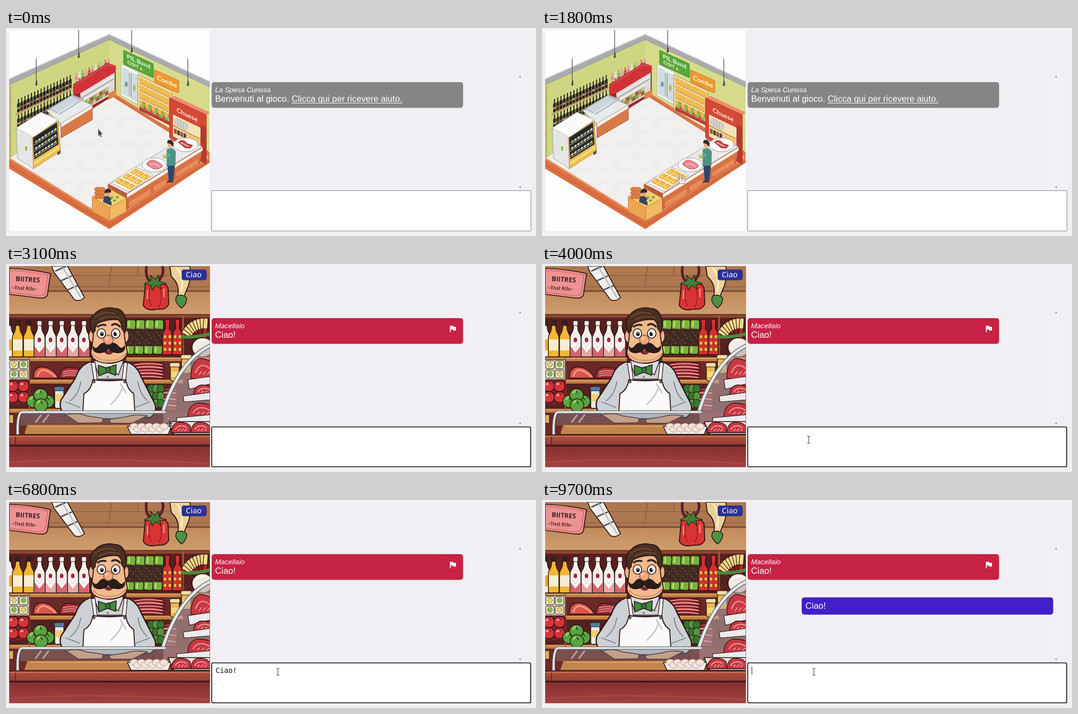
These frames come from a looping animation (1000x392 px, 9800 ms). An HTML page with a canvas:

```html
<!DOCTYPE html>
<html lang="it">
<head>
<meta charset="utf-8">
<title>Chat in bottega</title>
<style>
html, body { margin: 0; width: 100%; height: 100%; overflow: hidden; background: #f1eff3; }
canvas { display: block; width: 1000px; height: 392px; }
</style>
</head>
<body>
<canvas id="stage"></canvas>
<script>
const LOOP = 9800, STEP = 100, W = 1000, H = 392;
const S = window.devicePixelRatio || 1;
const SANS = '"Liberation Sans", Arial, sans-serif';
const MONO = '"DejaVu Sans Mono", monospace';
const HAND = 'Lato, sans-serif';
const INK = '#2a1514';
let g;

// Drawing helpers
function paint(p, fill, ink, w = 1) {
  if (fill) { g.fillStyle = fill; g.fill(p); }
  if (ink) { g.strokeStyle = ink; g.lineWidth = w; g.stroke(p); }
}
function shape(d, fill, ink, w) { paint(new Path2D(d), fill, ink, w); }
function box(x, y, w, h, r, fill, ink, lw) {
  const p = new Path2D();
  p.roundRect(x, y, w, h, r);
  paint(p, fill, ink, lw);
}
function oval(x, y, rx, ry, fill, ink, w, turn = 0) {
  const p = new Path2D();
  p.ellipse(x, y, rx, ry, turn, 0, Math.PI * 2);
  paint(p, fill, ink, w);
}
function label(s, x, y, font, fill = '#fff') {
  g.font = font;
  g.fillStyle = fill;
  g.fillText(s, x, y);
}
function rep(n, fn) { for (let i = 0; i < n; i++) fn(i); }
function fade(y0, y1, top, bottom) {
  const f = g.createLinearGradient(0, y0, 0, y1);
  f.addColorStop(0, top);
  f.addColorStop(1, bottom);
  return f;
}
function plane(x, y, slope, fn) {
  g.save();
  g.transform(1, slope, 0, 1, x, y);
  fn();
  g.restore();
}
function turned(x, y, a, fn) {
  g.save();
  g.translate(x, y);
  g.rotate(a);
  fn();
  g.restore();
}
function setup(c) {
  c.width = W * S;
  c.height = H * S;
  const ctx = c.getContext('2d');
  ctx.scale(S, S);
  ctx.lineJoin = ctx.lineCap = 'round';
  return ctx;
}
function layer(draw) {
  const c = document.createElement('canvas');
  g = setup(c);
  g.beginPath();
  g.rect(6, 4, 378.5, 379);
  g.clip();
  draw();
  return c;
}

// Isometric shop
function room() {
  box(6, 4, 379, 379, 0, '#fdfdfd');
  shape('M195 122 384 242 195 366 6 246Z', '#efeeed');
  rep(10, i => rep(10, j => {
    if ((i + j) % 2) return;
    const x = 195 + (i - j) * 18.9, y = 122 + (i + j) * 12.1;
    shape(`M${x} ${y}l18.9 12.1-18.9 12.1-18.9-12.1Z`, '#f2f1ef', '#ebe9e7', .5);
  }));
  shape('M6 104 195 20V124L6 246Z', '#ced681');
  shape('M195 20 384 108V245L195 124Z', '#d6db8c');
  shape('M6 110V246L10 243V108Z', '#b9b762');
  shape('M195 118 384 234V245L195 126Z', '#d9754a');
  shape('M6 96 195 12 384 101V111L195 22 6 107Z', '#a9abae', '#8b8e92', .7);
  shape('M6 96 195 12 384 101', null, '#cfd1d3', 1.6);
  shape('M6 244 195 361 384 242V254L195 379 6 265Z', '#dc7042');
  shape('M6 257 195 373 384 250', null, '#c9633b', 2);
  shape('M6 246 195 363 384 244', null, '#f0a175', 2);
  [[57, 58, 108], [137, 4, 56], [237, 4, 46], [343, 58, 109]].forEach(([x, a, b]) => {
    shape(`M${x} ${a}V${b}`, null, '#55575b', 1.3);
    shape(`M${x - 2} ${b}h4v-9h-2Z`, '#4c4e52');
  });
}
function bottles(x, y, n, tall, colors) {
  plane(x, y, -.46, () => rep(n, i => {
    const k = i * 6.1, c = colors[i % colors.length];
    box(k, -tall * .68, 5.2, tall * .68, 1, c);
    box(k + 1.6, -tall, 2, tall * .4, 0, c);
    box(k + .4, -tall * .38, 4.2, 3, 0, i % 3 ? '#a45a38' : '#d9bf7d');
  }));
}
function leftShelves() {
  [160, 189].forEach(y => {
    bottles(21, y, 17, 25, ['#272425', '#302823', '#211f23']);
    shape(`M18 ${y + 1}L124 ${y - 48}v4L18 ${y + 5}Z`, '#c4a06a');
  });
  bottles(130, 106, 11, 20, ['#d98ca1', '#e8e2d6', '#84ad72', '#e3a2ad', '#c55445']);
  shape('M127 106 191 66 207 71V125L144 164 127 152Z', '#962b2e');
  shape('M127 108 190 68 207 71 206 86 140 123 128 126Z', '#d2313a', '#ae2027', .7);
  shape('M128 109 190 69 206 72', null, '#e4585c', 2);
  shape('M140 123 205 84V122L143 157Z', '#dcdad6');
  plane(141, 127, -.59, () => {
    rep(3, r => box(0, r * 5, 62, 1.6, 0, r % 2 ? '#8d8f93' : '#fafafa'));
    box(0, 15, 52, 14, 0, '#6e8f62');
    rep(2, r => rep(9, i => oval(3 + i * 5.8, 18 + r * 8, 3, 3, ['#c8473b', '#8fb257', '#e3c16c'][(i + r) % 3])));
  });
  shape('M193 124l15-9v12l-15 9Z', '#dd8449');
  // Counter with glass
  shape('M77 156 123 129 163 145 104 180Z', '#e5e9e9', '#9ba4a7');
  shape('M104 180 163 145V173L104 207Z', '#d97b48', '#a75a37');
  shape('M104 180 163 145V151L104 187Z', '#f2f1ed');
  shape('M81 152 125 126 147 134 102 162Z', '#c6d3d7cc', '#8b979c');
  shape('M98 160l31-18M119 158l-15 16M138 147l-15 16', null, '#fff');
  // Fridge
  shape('M20 188 66 159 98 173 52 206V265L22 246Z', '#e4e5e5', '#a6a9a9');
  shape('M20 188 66 159 98 173 52 206Z', '#fafafa', '#c3c5c5');
  shape('M50 207 98 175 103 232 52 265Z', '#f0c04f', '#a9792d', .8);
  shape('M51 207 96 178 99 219 53 248Z', '#25282c');
  plane(54, 217, -.64, () => rep(3, r => {
    box(-1, r * 12 + 2, 44, 1.5, 0, '#a4a7a2');
    rep(7, i => oval(3 + i * 6, r * 12 - 1, 2.5, 2, (i + r) % 4 ? '#dddcad' : '#b9c95b'));
  }));
  shape('M54 255 100 225', null, '#f9dd92', 3);
  shape('M35 216l6 4v16l-6-4Z', '#e6efd8');
  oval(38, 227, 2, 5, '#91b957');
  shape('M97 234l6-4v6l-6 4Z', '#5b5547');
}
function rightShelves() {
  shape('M218 68 251 84V145L218 127Z', '#fafafa', '#a9b4b6');
  shape('M221 75l11 6v49l-11-6ZM236 83l11 6v50l-11-6Z', '#cfdddf', '#bccacd');
  shape('M233 85v43M236 87v43', null, '#68777b');
  oval(227, 106, 3, 5, '#72a0b5');
  oval(242, 113, 3, 7, '#c4b77d');
  plane(222, 42, .46, () => {
    box(0, 0, 56, 26, 2, '#58a839', '#387a28');
    label('PIL Bond', 6, 12, `bold 11px ${HAND}`, '#eef7e2');
    label('COIT a.', 7, 22, `bold 9px ${HAND}`, '#eef7e2');
  });
  plane(280, 79, .43, () => {
    box(0, 0, 46, 24, 2, '#ee9930', '#d67720');
    label('Combe', 5, 16, `bold 12px ${HAND}`, '#fff3d8');
  });
  shape('M249 88 313 119V192L249 154Z', '#f3e6be', '#a98851');
  plane(251, 93, .49, () => {
    rep(4, r => {
      box(0, r * 14 + 9, 61, 2, 0, '#c79c54');
      rep(10, i => oval(4 + i * 6, r * 14 + 4, 4, 5,
        r > 2 && i % 2 ? '#8fae4f' : '#f4c04c', '#d99837', .5, -.5));
    });
    box(0, 55, 61, 7, 0, '#b84038');
    rep(9, i => oval(5 + i * 6, 53, 3, 3, i % 2 ? '#d15b43' : '#8ab156'));
  });
  // Cheese stand
  shape('M309 132 318 128 384 159 378 164Z', '#ef8a6a');
  shape('M309 132 378 164V257L309 207Z', '#d34935', '#a93429');
  shape('M315 163 367 188V233L315 204Z', '#f4e2b7');
  plane(315, 163, .48, () => {
    label('Chuese', 7, -8, `bold 12px ${HAND}`, '#ffeadf');
    box(0, 20, 52, 2, 0, '#c28442');
    rep(4, i => {
      oval(8 + i * 5, 11, 4, 7, '#d5d3cd', '#929391', .6);
      box(2 + i * 6, 25, 5, 9, 0, i % 2 ? '#5d4035' : '#8f5d38');
      oval(31 + i * 6, 27, 4, 6, '#f3c878', '#d69b4b', .6);
    });
  });
  shape('M367 183l11 4v70l-11-6Z', '#b53a2e');
}
function counters() {
  shape('M193 294 334 207 371 224 228 312Z', '#e9eaec', '#a3a6a9');
  shape('M228 312 371 224 366 255 228 341Z', '#d97343', '#a94f31');
  shape('M193 294 228 312V341L193 322Z', '#bf5e39', '#a94f31');
  shape('M228 313 371 225V231L228 320Z', '#f5f4f2');
  shape('M232 327l42-26v13l-42 24ZM278 298l25-15v13l-25 14ZM321 271l42-25v11l-42 25Z', '#e78c58', '#ba5d38', .8);
  shape('M199 292 243 262 277 277 232 308Z', '#fbfaf7', '#aaa7a0');
  rep(3, i => rep(3, j => {
    const x = 213 + i * 14 + j * 10, y = 290 - i * 9 + j * 5;
    shape(`M${x - 7} ${y}l10-7 8 4-10 7Z`, '#f4ba3f', '#dc9328', .7);
    oval(x, y - 1, 2.5, 1.5, '#fbe082');
  }));
  [[280, 258, 23, 13], [339, 220, 23, 13]].forEach(p => oval(...p, '#fff', '#9c9c9c'));
  shape('M265 257q3-9 13-8 13 4 18 11-8 9-19 5Z', '#ea8792', '#b94f60');
  shape('M273 257q10-3 16 5', null, '#f6c3c7', 2);
  shape('M325 215q9-8 17 3l10 3q-3 9-15 4Z', '#c84748', '#933231');
  shape('M330 216l14 7', null, '#f0b8a9', 2);
  // Clerk
  shape('M304 254h15l-3 34-9 1Z', '#344468');
  shape('M306 288h9v3h-12Z', '#453132');
  shape('M304 229q10-6 16 4l-1 26-15 1Z', '#4d9488', '#377369', .7);
  shape('M306 235l-10 8 3 3 13-5', '#5eab9c');
  oval(299, 241, 4, 3, '#e7c861');
  oval(310, 219, 5, 7, '#e9ac82');
  shape('M304 217q0-8 8-6 6 4 3 13-4-7-11-7Z', '#342b2b');
  // Till
  shape('M163 318 193 302 227 321 196 339Z', '#f5ce70', '#cd9540');
  shape('M163 318 196 339V363L163 346Z', '#eda552', '#cc7b37');
  shape('M196 339 227 321V346L196 363Z', '#f1ba62', '#cc7b37');
  rep(9, i => oval(172 + i % 3 * 5, 304 + (i / 3 | 0) * 7, 5, 4, '#dd8045', '#b65f34', .6));
  oval(192, 311, 5, 6, '#e5a57b');
  shape('M186 311q-1-8 7-8 7 1 5 7Z', '#302b2c');
  shape('M185 318q8-4 14 4v13l-16-7Z', '#37445f');
  rep(6, i => oval(200 + i % 3 * 5, 319 + (i / 3 | 0) * 6, 3, 2, i % 2 ? '#e8d475' : '#70a34d'));
}
function store() { room(); leftShelves(); rightShelves(); counters(); }

// Butcher shop
function backdrop() {
  box(6, 4, 379, 379, 0, '#6d2925');
  box(6, 4, 379, 49, 0, '#ad7851');
  shape('M84 22H384M84 43H384M199 4l-5 39M249 4v18', null, '#845438', 1.2);
  box(6, 50, 379, 46, 0, fade(50, 95, '#c08a5c', '#cf9d6d'));
  shape('M6 51H384', null, '#7b4a32', 3);
  shape('M6 95H384V102H6Z', '#8f4332', INK);
  box(6, 102, 379, 73, 0, '#56211f');
  box(44, 184, 340, 33, 0, '#6b2928');
  box(6, 226, 379, 54, 0, '#55211f');
  [[6, 175, 155], [226, 175, 158], [44, 217, 110], [235, 217, 100], [6, 272, 110]].forEach(([x, y, w]) => {
    box(x, y, w, 9, 1, '#c37b43', INK, 1.2);
    box(x + 2, y + 2, w - 4, 2, 0, '#df9b5b');
  });
  shape('M44 178V278M334 98V176', null, '#a96037', 3);
}
function hangings() {
  shape('M6 8Q50 10 84 18L78 59Q74 66 61 64L6 57Z', '#ee9291', INK, 1.7);
  shape('M6 12Q49 14 79 21L74 55Q70 61 60 60L6 53', null, '#c9545c', 1.2);
  turned(18, 32, .06, () => {
    label('BIITRES', 0, 0, 'bold 12.5px "Open Sans", sans-serif', '#392025');
    label('–Tnsl Rils–', -6, 16, 'bold 9.5px "Open Sans", sans-serif', '#592c30');
  });
  shape('M86 4H116L148 63Q139 72 129 67L91 16Z', '#f2f0ed', INK, 1.7);
  rep(3, i => shape(`M${94 + i * 11} ${13 + i * 18}l18-8`, null, '#53545b', 3));
  shape('M108 8l33 55', null, '#bfc0c3', 3);
  shape('M265 4Q262 27 274 34M295 4Q300 18 288 31', null, '#5b1f25', 5);
  shape('M263 38Q276 32 288 39 304 34 306 47L307 76Q302 87 286 85 266 90 259 78Z', '#d93433', INK, 1.8);
  shape('M272 45Q266 64 274 78M291 47Q296 65 289 80', null, '#a72129', 2);
  shape('M267 50v15M298 47v14', null, '#f3826e', 3);
  shape('M260 38l14-8-2-9 9 8 7-8 1 11 14 5-13 2 3 8-11-6-6 8-3-9Z', '#437d35', INK, 1.2);
  shape('M309 4H347Q350 32 341 48L334 66 324 62Q329 38 312 24Z', '#ecd19a', INK, 1.8);
  shape('M323 8q13 16 8 42', null, '#fff0c7', 3);
  shape('M322 60Q334 56 341 64 340 78 331 83 323 77 320 68Z', '#4d9144', INK, 1.5);
}
function bottle(x, w, body, cap) {
  const a = w * .1, b = w * .22;
  shape(`M${x + a + b} 114h${w * .36}q0 12 ${b} 18q${a} 3 ${a} 8v35h${-w}v-35q0-5 ${a}-8q${b}-6 ${b}-18Z`, body, INK, 1.4);
  box(x + w * .28, 107, w * .44, 9, 2, cap, INK);
}
function topShelf() {
  [[-4, '#f4f0e7', '#e4a73b'], [12, '#f1b732', '#f7edce'], [33, '#f0b735', '#f7edce']].forEach(([x, c, tag]) => {
    bottle(x, 20, c, '#302525');
    box(x + 1, 142, 18, 21, 0, tag);
  });
  rep(5, i => {
    const x = 53 + i * 21, w = 20.5;
    bottle(x, w, '#f8f5ef', '#faf6ef');
    shape(`M${x + 1} 155l9 12 9.5-12v19H${x + 1}Z`, i % 2 ? '#e9a3a5' : '#d9626c');
    shape(`M${x + 10} 130l8 13-8 15-8-15Z`, '#fff', '#d6a4a5', .6);
    oval(x + 10, 143, 3.5, 4.5, '#a32a38');
  });
  rep(4, i => turned(235 + i * 17.5, 138, .05, () => {
    box(-9, -33, 17.5, 65, 4, '#78b23c', INK, 1.5);
    box(-8, -16, 15.5, 33, 0, '#422823');
    shape('M-4-29v9M-4 20v8', null, '#c0dd70', 3);
    rep(5, k => oval(-4 + k % 3 * 4, -9 + k * 5, 1.5, 1, '#8b5941'));
  }));
  [295, 314].forEach(x => {
    shape(`M${x + 5} 104h9l-1 18q6 6 6 16v33h-19v-33q0-10 6-16Z`, '#d62e31', INK, 1.5);
    rep(6, k => oval(x + 5 + k % 2 * 9, 137 + (k / 2 | 0) * 12, 3.2, 3.8, '#efbd42', '#8a2426'));
  });
  rep(8, i => turned(374, 149, -1.05 + i * .16, () => {
    box(-4, -47, 8, 46, 2, i % 2 ? '#b62229' : '#5a1d20', INK);
    box(-4, -47, 8, 20, 2, '#f2d885', INK);
  }));
  shape('M333 137q24 2 51-5', null, '#4d873a', 6);
  oval(371, 157, 20, 18, '#f3eae2', INK, 1.5);
  shape('M358 151q8-10 17-7', null, '#fff', 3);
}
function lowShelves() {
  box(4, 180, 40, 38, 2, '#cfcbb2', INK);
  rep(4, i => {
    const x = 15 + i % 2 * 18, y = 189 + (i / 2 | 0) * 18;
    box(x - 8, y - 7, 16, 15, 3, '#faf6e2', INK);
    oval(x, y, 5, 5, i % 3 ? '#8eb648' : '#e9cd64', '#758147');
  });
  box(4, 219, 41, 45, 2, '#762527');
  rep(4, i => {
    const x = 13 + i % 2 * 20, y = 230 + (i / 2 | 0) * 21;
    oval(x, y, 10.5, 10.5, '#d8333b', INK, 1.3);
    oval(x - 3, y - 4, 3, 2, '#f39a91');
    shape(`M${x} ${y - 8}l3 4`, null, '#7d1d25', 2);
  });
  shape('M52 215Q51 194 70 194 89 196 99 215Z', '#dc5550', INK, 1.4);
  shape('M59 211q4-13 14-11 10 3 20 12', null, '#f4a17c', 3);
  shape('M101 215q2-21 19-20l32 3-7 17Z', '#a62f37', INK, 1.3);
  rep(3, i => shape(`M108 ${203 + i * 4}q18-5 35 2`, null, '#edaaa0', 1.5));
  rep(5, i => shape(`M238 ${188 + i * 6}q31-8 59 0l3 5q-32-5-62 0Z`, i % 2 ? '#ce4549' : '#a92734', INK));
  rep(5, i => shape(`M243 ${190 + i * 6}q25-4 51 0`, null, '#f1b8b3', 1.7));
  [[310, 191, 17], [331, 176, 18]].forEach(([x, y, w]) => {
    box(x, y, w, 30, 5, '#e8b951', INK, 1.4);
    box(x - 1, y - 5, w + 2, 8, 2, '#f3dfa8', INK);
    box(x + 2, y + 12, w - 5, 10, 1, '#f5d784');
  });
  [[52, 259], [78, 259], [65, 247], [66, 266]].forEach(([x, y]) => {
    oval(x, y, 13, 12, '#57a43f', INK, 1.4);
    shape(`M${x - 6} ${y - 4}q3-5 7-4`, null, '#a2cf69', 3);
    shape(`M${x} ${y - 8}l2 5`, null, '#263e25', 2);
  });
  box(92, 236, 17, 36, 4, '#e5edf0', INK, 1.3);
  box(91, 231, 19, 8, 2, '#557da2', INK);
  box(94, 245, 13, 14, 1, '#f3cd78');
  rep(7, i => shape(`M294 ${236 + i * 6}q13-5 28 0v4q-15-3-28 0Z`, i % 2 ? '#e5807e' : '#b4303b', INK, .8));
  rep(9, i => oval(274 + i % 3 * 9, 235 + (i / 3 | 0) * 14, 7, 8, i % 2 ? '#4f963d' : '#37762f', INK));
}
function butcher() {
  shape('M160 184Q139 190 131 215L104 256Q98 272 112 284L150 292H235L273 289Q288 277 279 260L255 213Q247 190 226 184 194 198 160 184Z', '#cdd1d4', INK, 2.3);
  shape('M141 222q-3 23-20 36M249 222q3 22 17 35M113 260l26 10M271 260l-26 10', null, '#798087', 1.8);
  shape('M165 182l10 27 18-15 19 15 10-27Z', '#dde0e1', INK, 1.4);
  shape('M161 186 166 219H226L229 186 223 185 219 217H172L168 185Z', '#f4f3f2', INK, 1.3);
  shape('M164 218Q160 239 147 244L145 278H243L241 244Q229 237 226 218Q194 222 164 218Z', '#fbfaf9', INK, 1.8);
  shape('M220 231q-4 17-22 33M216 226l10 17', null, '#c8cbd0', 3);
  oval(166, 222, 2.3, 2.3, '#7d8388', INK);
  oval(224, 222, 2.3, 2.3, '#7d8388', INK);
  oval(162, 136, 6, 12, '#eeb082', INK, 1.7);
  oval(226, 136, 6, 12, '#eeb082', INK, 1.7);
  shape('M166 108Q166 138 160 167 162 186 194 187 226 186 229 166 222 140 222 108 196 92 166 108Z', '#f2b98c', INK, 1.8);
  shape('M164 169q9 13 30 13 22 0 32-14', null, '#d18c67', 2);
  shape('M163 130C158 114 155 101 166 96 174 84 192 80 206 84 220 84 226 98 225 108 228 116 227 124 224 130L218 121Q219 110 211 105 192 103 173 112 168 118 168 126Z', '#493022', INK, 1.8);
  shape('M168 100q20-14 38-6M176 105q18-9 38-4', null, '#7a4f36', 1.8);
  [[180, 131], [207, 131]].forEach(([x, y], i) => {
    oval(x, y, 8, 9, '#fff', INK, 1.5);
    oval(x + (i ? -1 : 1), y + 1, 3.3, 4, '#24191a');
    oval(x + 1, y - 1, 1, 1, '#fff');
    shape(`M${x - 7} ${y - (i ? 16 : 13)}q7-5 15 ${i ? 3 : -3}`, null, '#35231e', 3.5);
  });
  oval(194, 163, 9, 7, '#862b30', INK);
  box(188, 159, 13, 4, 1, '#fff');
  shape('M193 150Q182 146 175 155 169 163 164 155 163 169 180 167 189 166 193 160 198 166 208 167 225 169 224 154 218 163 212 155 204 146 193 150Z', '#2a1e1d', INK, 1.3);
  oval(193, 143, 9, 9, '#eba77e', '#8a503d', 1.4);
  oval(190, 140, 3, 2, '#f9ceab');
  shape('M174 191l16 5 18-6-1 20-15-6-17 7Z', '#448a3d', INK, 1.6);
  box(188, 195, 9, 10, 2, '#346d31', INK);
  oval(192, 213, 1.7, 1.7, '#686d70');
  shape('M113 284Q137 279 151 286L184 291 181 299 137 300Z', '#e8ad83', INK, 1.5);
  shape('M267 286Q242 282 227 288L194 293 198 300 238 300Z', '#e8ad83', INK, 1.5);
}
function steak(x, y, w, h) {
  shape(`M${x} ${y + h}q0-${h * .8} ${w * .35}-${h}q${w * .5} 0 ${w * .65} ${h * .4}v${h * .6}Z`, '#c73843', INK, 1.3);
  shape(`M${x + w * .2} ${y + h * .7}q${w * .2}-${h * .6} ${w * .6}-${h * .2}`, null, '#f19a99', 2);
  rep(3, i => shape(`M${x + w * (.35 + i * .18)} ${y + h * .8}l${w * .1}-${h * .15}`, null, '#f7c6bd', 1.2));
}
function display() {
  shape('M384 154Q321 192 297 278V300H384Z', '#b9a3a399');
  steak(349, 178, 44, 38);
  shape('M343 218L385 212V226L346 236Z', '#eceaea', INK, 1.2);
  steak(354, 228, 40, 18);
  shape('M334 249L385 242V256L336 260Z', '#eceaea', INK, 1.2);
  steak(343, 262, 50, 26);
  shape('M322 290L385 284V298H322Z', '#eceaea', INK, 1.2);
  shape('M385 154C344 174 316 216 296 278', null, '#686d72', 8);
  shape('M385 154C344 174 316 216 296 278', null, '#e5eaeb', 5);
  box(27, 280, 270, 24, 0, '#8b8a9466');
  shape('M40 302H310V321H34Z', '#c2854e', '#6d392a', 1.4);
  shape('M46 306H232', null, '#d9a467', 2);
  shape('M66 285l-10 13M80 285l-10 13', null, '#f0f4f580', 3);
  shape('M22 321Q21 281 30 279H300', null, '#686d72', 6);
  shape('M22 321Q21 281 30 279H300', null, '#e5eaeb', 3.6);
  box(6, 284, 8, 16, 1, '#dfb25e', INK);
  shape('M229 306H312L306 321H236Z', '#f0eeeb', INK, 1.6);
  rep(9, i => oval(242 + i * 7, 306 + i % 2 * 5, 8, 6, '#f5e3dc', '#a58582', .8));
  shape('M306 297H385V321H317Z', '#e8dedd', INK, 1.5);
  rep(2, i => steak(312 + i * 37, 298, 36, 20));
  box(6, 322, 379, 20, 0, fade(322, 342, '#b0523f', '#953d35'), INK, 1.5);
  shape('M6 325H384', null, '#c96f50', 2);
  shape('M6 342H384', null, '#3b1719', 3);
  box(6, 344, 379, 40, 0, fade(344, 383, '#86302f', '#a24340'));
  shape('M6 374Q160 363 384 376', null, '#a94b45', 2);
  shape('M18 326v14', null, '#682c2b', 2);
}
function shop() {
  backdrop(); hangings(); topShelf(); lowShelves(); butcher(); display();
  box(332, 11, 46, 19, 3, '#2b319b', '#232781');
  label('Ciao', 339.3, 24.5, '14.5px "Noto Sans", "Open Sans", sans-serif');
}

// Chat panel
const OPEN = 2150, SENT = 7100;
const KEYS = [[4700, 'C'], [4900, 'i'], [5100, 'a'], [5300, 'o'], [6200, '!']];
const clamp = v => Math.min(1, Math.max(0, v));
const swing = v => .5 - Math.cos(Math.PI * clamp(v)) / 2;

function bubble(x, y, h, color) {
  if (h > 0) box(x, y, 474.5, h, Math.min(5, h / 2), color);
}
function chat(t) {
  g.textBaseline = 'alphabetic';
  const name = `italic 13.2px ${SANS}`, text = `16.56px ${SANS}`;
  if (t < OPEN) {
    bubble(388, 102, 48.5, '#868586');
    label('La Spesa Curiosa', 394.5, 120.5, name);
    label('Benvenuti al gioco. ', 394.5, 139, text);
    const x = 394.5 + g.measureText('Benvenuti al gioco. ').width, help = 'Clicca qui per ricevere aiuto.';
    label(help, x, 139, text);
    box(x, 141, g.measureText(help).width, 1, 0, '#fff');
    return;
  }
  bubble(388, 102, 48.5 * swing((t - OPEN) / 400), '#c82245');
  box(829.5, 109.5, 26, 25, 3, '#c8224566', '#bd2444');
  label('Macellaio', 394.5, 120.5, name);
  label('Ciao!', 394.5, 139, text);
  shape('M837.5 116.5h6l.5 2h5v7h-5l-.6-2h-4.3v5h-1.6Z', '#fff');
  if (t < SENT) return;
  bubble(490, 183.5, 32.5 * swing((t - SENT) / 400), '#421fca');
  label('Ciao!', 497, 205, text);
}
function panel(t) {
  box(965, 85, 10, 222, 0, '#f2f0f4');
  shape('M967.5 93l2.5-3 2.5 3ZM967.5 299l2.5 3 2.5-3Z', '#929195');
  if (t < OPEN) {
    box(388, 306.5, 602.5, 76, 1, '#fff', '#858585');
    return;
  }
  box(388.2, 307, 601.8, 75.3, 2, '#fff', '#101010', 1.6);
  const typed = t < SENT ? KEYS.filter(k => k[0] <= t) : [];
  const s = typed.map(k => k[1]).join('');
  label(s, 395.5, 326, `13.3px ${MONO}`, '#111');
  let since = t < SENT ? OPEN : SENT;
  if (typed.length) since = typed[typed.length - 1][0];
  if ((t - since) % 1200 < 600) box(395.5 + g.measureText(s).width, 314, 1, 15, 0, '#222');
}

// Pointer path: time, x, y
const PATH = [[0, 174, 190], [1100, 216, 250], [2000, 273, 284], [2900, 273, 284], [3700, 503, 331], [4100, 503, 331], [4500, 513, 323.5], [LOOP, 513, 323.5]];
function pointer(t) {
  const i = Math.max(1, PATH.findIndex(p => t <= p[0]));
  const [a, x0, y0] = PATH[i - 1], [b, x1, y1] = PATH[i];
  const k = i < 3 ? (t - a) / (b - a) : swing((t - a) / (b - a));
  const x = x0 + (x1 - x0) * k, y = y0 + (y1 - y0) * k;
  g.save();
  g.translate(x, y);
  if (x > 388 && y > 306) {
    shape('M-2.5-6.5H-1L0-5.5 1-6.5H2.5M0-5.5V5.5M-2.5 6.5H-1L0 5.5 1 6.5H2.5', null, '#555', 1.2);
  } else if (x > 250 && x < 300) {
    shape('M-1 0q2-2 3 1v6l7 2q2 1 1 4l-2 4H1l-7-8q1-2 5 1Z', '#f1f1f0', '#77787a', 1);
    shape('M3 10v3M6 10v3', null, '#999', .8);
  } else {
    shape('M0 0 8.5 10 5 10.5 7 15 4.7 16 2.8 11.5 0 14Z', '#484648', '#d9d7d7', .7);
  }
  g.restore();
}

const scenes = [layer(store), layer(shop)];
const screen = setup(document.getElementById('stage'));
function draw(now) {
  const t = Math.floor(now % LOOP / STEP) * STEP;
  g = screen;
  box(0, 0, W, H, 0, '#f1eff3');
  g.drawImage(scenes[t < OPEN ? 0 : 1], 0, 0, W, H);
  chat(t);
  panel(t);
  pointer(t);
}
const start = performance.now();
function tick() {
  draw(performance.now() - start);
  requestAnimationFrame(tick);
}
tick();
</script>
</body>
</html>
```
